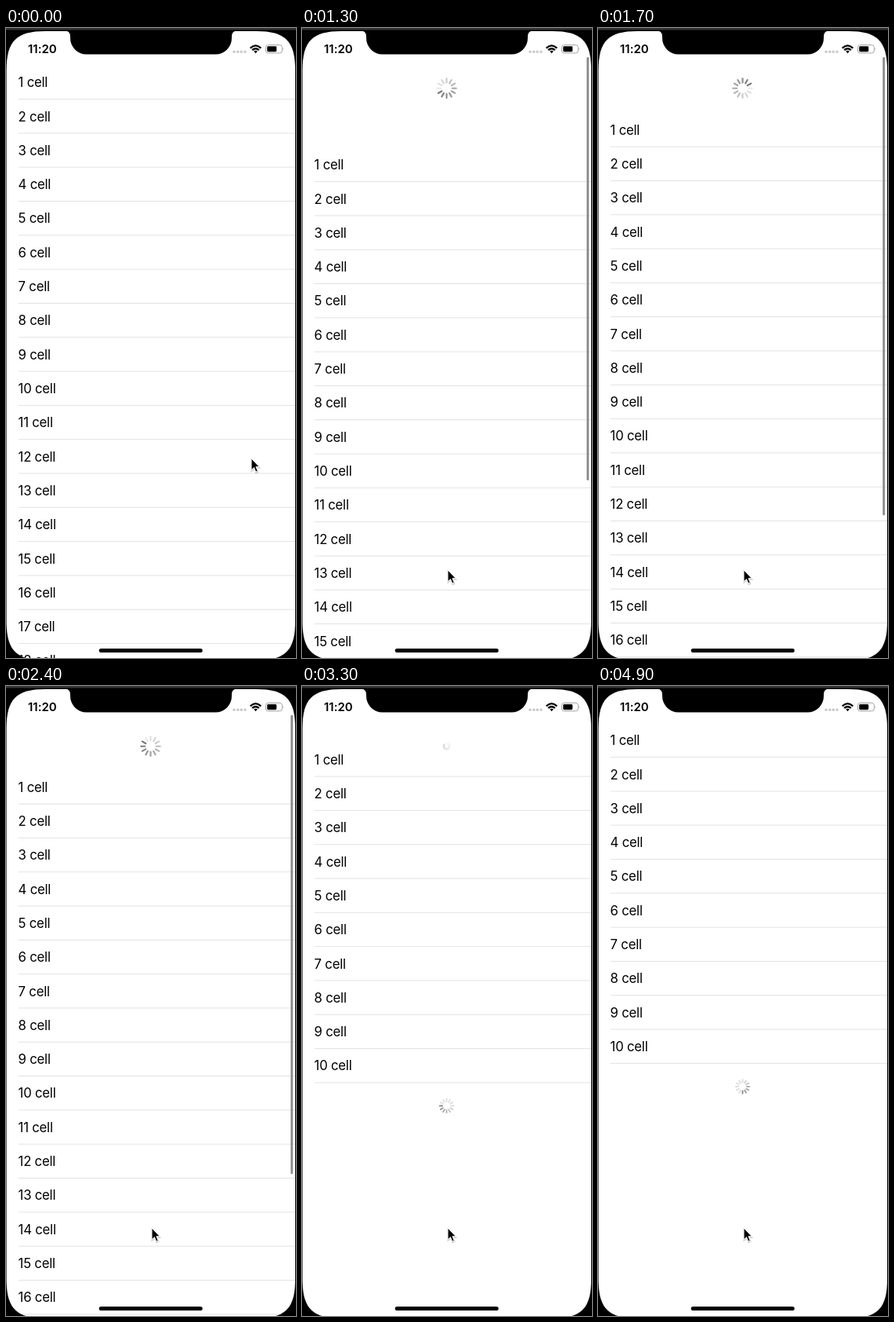
Write an HTML page that moves like this. It is 370 by 802 pixels and loops after 5000 ms.

```html
<!DOCTYPE html>
<html lang="en">
<head>
<meta charset="utf-8">
<title>Pull to refresh</title>
<style>
  html, body { margin: 0; width: 100%; height: 100%; overflow: hidden; background: #000; }
  svg { display: block; width: 370px; height: 802px; }
  text { font-family: Inter, "Liberation Sans", sans-serif; fill: #000; }
  .cell { font-size: 16.8px; letter-spacing: -0.25px; }
  .clock { font-size: 15px; font-weight: 600; letter-spacing: -0.05px; text-anchor: middle; }
</style>
</head>
<body>
<svg viewBox="0 0 370 802">
  <defs>
    <path id="screen" d="M0.6 54 C0.6 16.500 13.100 4 50.600 4 H319 C356.500 4 369 16.500 369 54
      V755 C369 792.500 356.500 805 319 805 H50.600 C13.100 805 0.600 792.500 0.600 755 Z"/>
    <clipPath id="clip"><use href="#screen"/></clipPath>
  </defs>
  <rect width="370" height="802"/>
  <rect width="370" height="2.6" fill="#333335"/>
  <use href="#screen" fill="#fff"/>
  <path d="M76 3.5 Q82 4 82 11 V13 A20.500 20.500 0 0 0 102.500 33.500 H267.500 A20.500 20.500 0 0 0 288 13 V11 Q288 4 294 3.5 Z"/>

  <text class="clock" x="46.3" y="32">11:20</text>
  <g fill="#c9c9cb">
    <circle cx="291" cy="30.3" r="1.7"/><circle cx="295.7" cy="30.3" r="1.7"/>
    <circle cx="300.3" cy="30.3" r="1.7"/><circle cx="305" cy="30.3" r="1.7"/>
  </g>
  <g fill="none" stroke="#000" stroke-width="2.3">
    <path d="M311.7 25.6 Q318.5 19.2 325.3 25.6"/>
    <path d="M314.2 28.2 Q318.5 24.2 322.8 28.2"/>
  </g>
  <path d="M316.2 29.7 Q318.5 27.7 320.8 29.7 L318.5 32.2 Z"/>
  <rect x="331.5" y="21.6" width="20.8" height="10.3" rx="2.9" fill="none" stroke="#a3a3a3"/>
  <rect x="333.2" y="23.3" width="12" height="6.9" rx="1.4"/>
  <path d="M353.6 25 Q355.3 26.7 353.6 28.5 Z" fill="#a3a3a3"/>

  <g clip-path="url(#clip)"><g id="list"></g></g>
  <g id="top"></g>
  <rect id="bar" x="363.2" y="37" width="2.9" rx="1.45" fill="#8e8e8e"/>
  <rect x="118.7" y="790" width="132" height="5" rx="2.5"/>
  <g id="cursor">
    <path d="M0 0 V14.8 L3.4 11.6 L5.8 17.2 L8.3 16.1 L5.9 10.7 H10.3 Z"
      opacity="0.18" transform="translate(0.3 1.3)" stroke="#000" stroke-width="1.5"/>
    <path d="M0 0 V14.8 L3.4 11.6 L5.8 17.2 L8.3 16.1 L5.9 10.7 H10.3 Z"
      stroke="#fff" stroke-linejoin="round"/>
  </g>
</svg>
<script>
const NS = 'http://www.w3.org/2000/svg';
const LOOP = 5000, STEP = 100, PITCH = 43.31, REST = 59.5, RELOAD = 3200;
const $ = id => document.getElementById(id);
const list = $('list'), wheel = $('top'), bar = $('bar'), cursor = $('cursor');

function add(parent, tag, attrs) {
  const el = document.createElementNS(NS, tag);
  for (const k in attrs) el.setAttribute(k, attrs[k]);
  return parent.appendChild(el);
}

const rows = [];
for (let i = 0; i < 18; i++) {
  const row = add(list, 'g', {});
  add(row, 'text', { class: 'cell', x: 15.6, y: 75.2 + i * PITCH }).textContent = `${i + 1} cell`;
  add(row, 'rect', { x: 16, y: 90.1 + i * PITCH, width: 353, height: 1, fill: '#e2e2e4' });
  rows.push(row);
}

function makeSpinner(g, inner, outer, width, color) {
  return Array.from({ length: 12 }, (_, i) => add(g, 'line', {
    y1: -inner, y2: -outer, stroke: color, 'stroke-width': width,
    'stroke-linecap': 'round', transform: `rotate(${i * 30})`
  }));
}
const topSpokes = makeSpinner(wheel, 7.2, 12.3, 2.1, '#727272');
const foot = add(list, 'g', { transform: 'translate(184.5 510)' });
const footSpokes = makeSpinner(foot, 5.4, 8.8, 1.9, '#8c8c90');

// the leading spoke is darkest, the ones behind it fade out
function spin(spokes, angle, fall, min) {
  const lead = Math.floor(angle / 30);
  spokes.forEach((s, i) => {
    const behind = (((lead - i) % 12) + 12) % 12;
    s.setAttribute('opacity', Math.max(min, 1 - behind * fall));
  });
}

// linear key track with rows of [time, ...values], held at both ends
function track(keys, t) {
  let i = 0;
  while (i < keys.length - 1 && keys[i + 1][0] <= t) i++;
  const a = keys[i], b = keys[i + 1];
  if (!b || t <= a[0]) return a.slice(1);
  const p = (t - a[0]) / (b[0] - a[0]);
  return a.slice(1).map((v, j) => v + (b[j + 1] - v) * p);
}

const POINTER = [[0, 313, 548], [100, 160, 453], [200, 160, 453], [400, 160, 330],
  [600, 159, 150], [800, 163, 175], [900, 174, 505], [1000, 181, 610], [1100, 186, 690]];
const PULL = [[800, 0], [900, 136], [1000, 168], [1100, 188], [1200, 177]];
const BACK = [[3100, REST], [3200, 49], [3300, 24.5], [3400, 7], [3500, 1.5], [3600, 0]];
const SHRINK = [[3100, 1, 1], [3200, 0.72, 0.85], [3300, 0.38, 0.6], [3400, 0, 0]];
const BAR_FADE = [[2700, 1], [3000, 0]];

function offset(t) {
  if (t < 1200) return track(PULL, t)[0];
  if (t < 3100) return REST + 45.5 * Math.exp((1300 - t) / 105);
  return track(BACK, t)[0];
}

function draw(t) {
  const y = offset(t), pulled = t >= 900, done = t >= RELOAD;
  list.setAttribute('transform', `translate(0 ${y.toFixed(2)})`);
  rows.forEach((r, i) => r.setAttribute('display', done && i >= 10 ? 'none' : 'inline'));

  const [cx, cy] = track(POINTER, t);
  cursor.setAttribute('transform', `translate(${cx} ${cy})`);

  const lag = t < 1200 ? 24 : 0;
  bar.setAttribute('height', 644 - y - lag);
  bar.setAttribute('opacity', pulled ? track(BAR_FADE, t)[0] : 0);

  const [size, alpha] = track(SHRINK, t);
  wheel.setAttribute('transform', `translate(184.5 76.7) scale(${size})`);
  wheel.setAttribute('opacity', pulled ? alpha : 0);
  if (t < 1000) spin(topSpokes, 0, 0, 1);
  else spin(topSpokes, 268 + (t - 1300) * 0.382, 0.078, 0.15);

  foot.setAttribute('display', done ? 'inline' : 'none');
  spin(footSpokes, 292 + (t - 3300) * 0.382, 0.12, 0.28);
}

const start = performance.now();
function tick() {
  const t = (performance.now() - start) % LOOP;
  draw(Math.floor(t / STEP) * STEP);
  requestAnimationFrame(tick);
}
draw(0);
requestAnimationFrame(tick);
</script>
</body>
</html>
```
